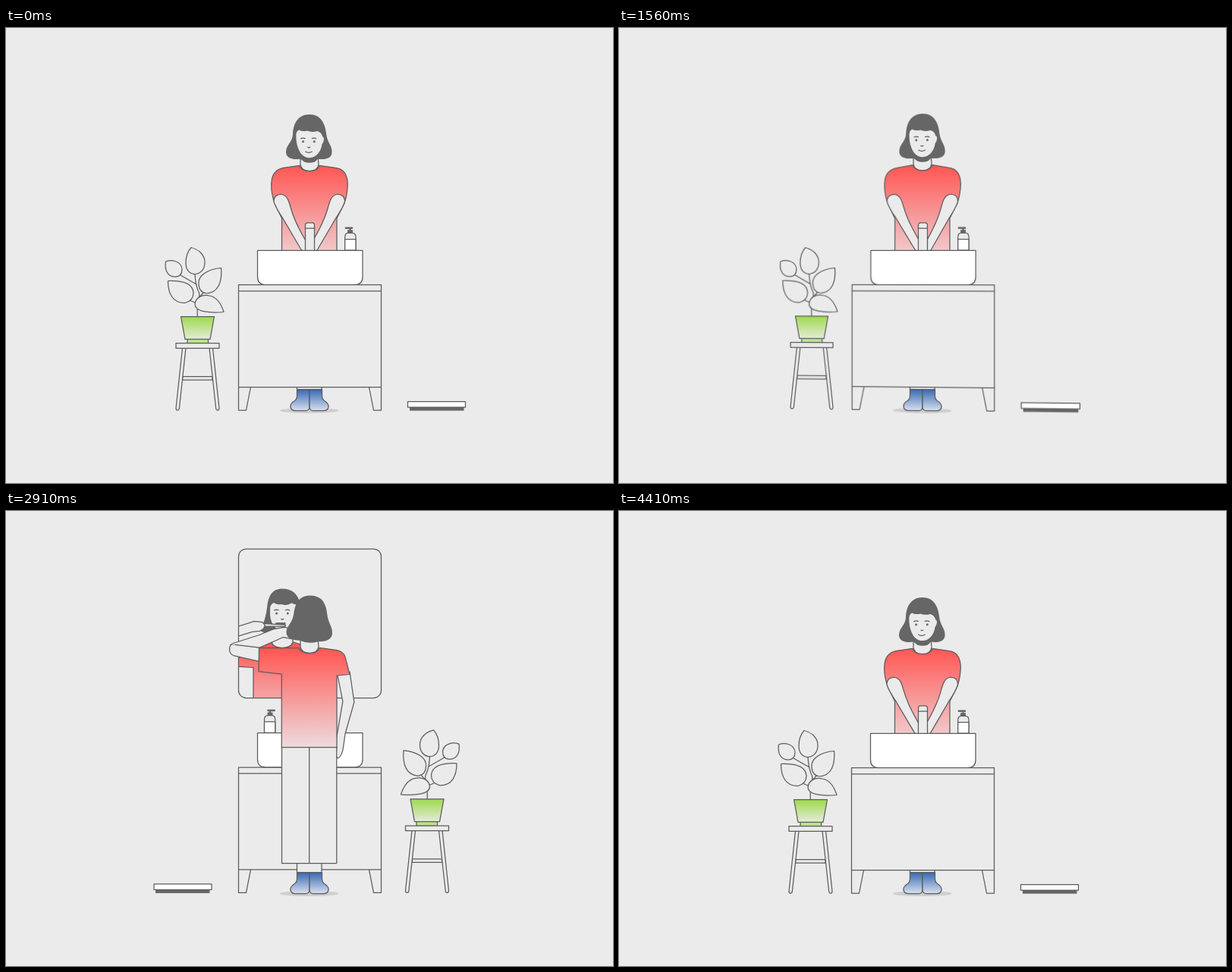
These frames come from a looping animation (800 px wide and 600 px high, 4.44 s). An HTML page:

```html
<!DOCTYPE html>
<html lang="en">
<head>
<meta charset="utf-8">
<title>Bathroom routine</title>
<style>
  html, body { margin: 0; width: 100%; height: 100%; overflow: hidden; background: #ebebeb; }
  #stage { position: absolute; left: 0; top: 0; width: 800px; height: 600px; overflow: hidden;
    perspective: 1150px; perspective-origin: 400px 300px; }
  svg { position: absolute; left: 0; top: 0; transform-origin: 400px 300px; }
  .ln { fill: none; stroke: #5c5c5c; stroke-width: 1.25; stroke-linejoin: round; stroke-linecap: round; }
  .bg { fill: #ebebeb; }
  .wh { fill: #fff; }
  .dk { fill: #666; }
</style>
</head>
<body>
<div id="stage"></div>
<script>
const LOOP = 4440, STEP = 30, TURN = 1680, CUT = 3900;
const TAU = Math.PI * 2;

const path = (d, cls = 'ln bg', more = '') => `<path d="${d}" class="${cls}" ${more}/>`;
const rect = (x, y, w, h, cls = 'ln bg', more = '') =>
  `<rect x="${x}" y="${y}" width="${w}" height="${h}" class="${cls}" ${more}/>`;
const dot = (x, y, r = 1.5) => `<circle cx="${x}" cy="${y}" r="${r}" class="dk"/>`;
const group = (id, body) => `<g id="${id}">${body}</g>`;
const flip = (width, body) => `<g transform="matrix(-1 0 0 1 ${width} 0)">${body}</g>`;
const grad = (id, y1, y2, a, b) =>
  `<linearGradient id="${id}" gradientUnits="userSpaceOnUse" x1="0" x2="0" y1="${y1}" y2="${y2}">
   <stop stop-color="${a}"/><stop offset="1" stop-color="${b}"/></linearGradient>`;
const paint = id => `style="fill:url(#${id})"`;

const defs = '<defs>' +
  grad('red', 183, 313, '#ff5855', '#eedcdf') +
  grad('redGlass', 175, 298, '#ff5855', '#eedcdf') +
  grad('green', 381, 411, '#9fda50', '#e6ecdc') +
  grad('blue', 477, 505, '#3a6ab4', '#dbe2ef') +
  '<clipPath id="glass"><rect x="306.5" y="50" width="188" height="196.5" rx="10"/></clipPath></defs>';

const leaves =
  path('M249 324Q249.5 337 253 346M230 326L251 338M262 347L254 356M243 359.5L250 362.5' +
       'M253 346Q257 352 252.5 359Q252 364 252.3 380', 'ln') +
  path('M244 289.5C239 295 237 302 237 310C237 319 242 324.5 249 324.5C257 324 262 318 262 309C262 299 254 292 244 289.5Z') +
  path('M210.5 308C218 305 231 307 232 318C232 325 229 328 223 328C212 328 209 318 210.5 308Z') +
  path('M283.5 316.5C266 318 253 326 254 337C254 345 258 349 264 350C280 349 285 335 283.5 316.5Z') +
  path('M213.5 333.5C228 333 246 335 247 349C247 357 242 361 236 362.5C219 363 213.5 349 213.5 333.5Z') +
  path('M249 364C250 355 259 351 268 353C279 355 284 365 287 374.5C270 376 249 375 249 364Z');

const plant = id =>
  group(id, leaves) +
  rect(239, 409, 27.5, 7, 'ln', 'style="fill:#b9e387"') +
  path('M230.5 380.5H274.5L269 410.3H236Z', 'ln', paint('green')) +
  path('M233 459.5H272V464H232.5Z') +
  path('M232.5 422L224 501.5Q224 504 226 504Q228 504 228.3 502L237 422Z') +
  path('M268 422L276.7 502Q277 504 279 504Q281 504 281 501.5L272.5 422Z') +
  rect(224, 415.7, 57, 6.6);

const scales = rect(532, 500, 71.5, 4.6, 'dk') + rect(529.5, 492.5, 76, 7.5, 'ln wh');

const soap =
  path('M446.7 293V276Q446.7 270.3 451 270.3H456.5Q461 270.3 461 276V293Z') +
  rect(446.7, 278.5, 14.3, 14.5, 'ln wh') +
  rect(450, 266.3, 7, 4, 'dk') + rect(452.4, 264, 2.2, 3, 'dk') +
  rect(446.6, 262.5, 10.6, 2.4, 'dk', 'rx="1"');

const sink = path('M331.5 293.3H470V328Q470 338.5 460 338.5H341.5Q331.5 338.5 331.5 328Z', 'ln wh');

const cabinet =
  path('M306.5 473.5V504H316.5L322.5 473.5M494.5 473.5V504H484.5L478.5 473.5') +
  rect(306.5, 338.7, 188, 134.8) + path('M306.5 346.8H494.5', 'ln');

const sock = path('M383.5 476.5V485Q383.5 490 379 492.5Q374.5 495.5 375 500' +
  'Q376 504.5 381 504.5H396Q400 504 400 499V476.5Z', 'ln', paint('blue'));
const feet =
  '<ellipse cx="399.7" cy="504.5" rx="39" ry="3.6" fill="#cfcfcf"/>' +
  rect(383.5, 455, 32.5, 22) + sock + flip(800, sock);

const neck = path('M388 168V180Q389 188.5 400 188.8Q411 188.5 412 180L411 168Z');

// Facial features shared by the person and the reflection, centred on the eyes
const face =
  path('M-10.5 -4Q-8 -5.3 -5 -4.2M4 -4.2Q7 -5.3 9.5 -4', 'ln') +
  dot(-7.7, 0) + dot(7, 0) + path('M-1.5 7.5Q0 8.8 1.5 7.5', 'ln');

const washArm = path('M353 229C353 221 359 218.5 364 219.5C371 221 373 229 375.5 238' +
  'C379 251 385 263 393 277L400 290V300H394L388 290.5L364 249.5Q356 238 353 229Z');

const front =
  feet +
  group('frontTorso', '') +
  group('armL', washArm) + flip(799.5, group('armR', washArm)) +
  group('frontHead',
    path('M400 114C384 114 378.5 127 378 140C377.5 151 369 154 369 163.5C369 172 378 174 388 172.7' +
         'L393 176.5Q400 179 407 176.5L411 172.7C421 174 429.5 172 429.5 163.5' +
         'C429.5 154 423 151 422 139C420.5 126 415 114 400 114Z', 'dk') +
    path('M382.3 141Q382.5 136 386 134.5Q391 137 397 135.5Q403 138 410 136Q416 137.5 416.8 143' +
         'Q419.5 144 418.8 148Q418 152 416.5 153C415 164 408 171.2 399.5 171.2' +
         'C389 171.2 382 158 382.3 141Z', 'bg') +
    group('frontFace', face + path('M-4.5 13.3Q-.5 16 4 13.3', 'ln'))) +
  rect(394.5, 256.8, 12, 40, 'ln bg', 'rx="3"') + path('M394.5 264.2H406.5', 'ln') +
  soap + sink + cabinet + plant('frontLeaves') + scales;

const reflection =
  path('M306 194L335 178L352 172H376L392 177V248H326V206.5L306 205Z', 'ln', paint('redGlass')) +
  group('mirHead',
    path('M361 105C348 105 343.5 114 341.5 126C339.5 144 336 152 331.5 160Q340 166 353 161L372 165L385 150' +
         'V125C381 111 374 105 361 105Z', 'dk') +
    path('M345 140V130Q346 125 350 123.5Q354 126.5 360 125.5Q368 128 373 124L379 126V142C378 153 371 160 362 160' +
         'C352 160 346 151 345 140Z', 'bg') +
    group('mirFace', face)) +
  path('M350 167V173Q352 180 364 180.5Q376 180 378 173V164') +
  group('brush',
    rect(355, 148.3, 13, 3.2, 'dk') +
    path('M338 149.5L367 151.3Q369 152.5 367 153.6L338 153.2Z') +
    path('M300 155L327 146.5L337.5 147.8L341 152L339 156.5L334 159.5L324 160.5L300 168Z'));

const back =
  '<g transform="translate(0 -.7)">' +
  flip(801, cabinet) + sink + flip(801.5, soap) + flip(807.5, plant('backLeaves')) + flip(800.5, scales) + '</g>' +
  `<g clip-path="url(#glass)">${reflection}</g>` +
  rect(306.5, 50, 188, 196.5, 'ln', 'rx="10"') +
  feet +
  group('hang', '') +
  group('raised',
    path('M334 181L303 177L296 177.5Q294 181 295 187Q297 191.5 303 192.5L336 200Z') +
    path('M296 177.8Q298 175.5 303 174.3L333 164.8L352 157L366 154.5L380 156L378 170L365 167.5L352 173.5L334 181.3L302 177.5')) +
  rect(363.5, 311, 72.3, 153.5) + path('M399.7 311V464.5', 'ln') +
  group('backTorso', '') +
  group('backHead',
    path('M399.5 114C385 114 379.5 124 378 138C376.5 152 369 154 369 163.5C369 171 377 174 387 173.7' +
         'Q399 178.5 411 174.3C422 174 429.5 171 429.5 162.5C429.5 154 424 150 422 138' +
         'C420 123 414 114 399.5 114Z', 'dk'));

const stage = document.getElementById('stage');
const open = id => `<svg id="${id}" width="800" height="600" viewBox="0 0 800 600">`;
stage.innerHTML = `<svg width="0" height="0">${defs}</svg>${open('front')}${front}</svg>${open('back')}${back}</svg>`;

const $ = id => document.getElementById(id);
const move = (id, v) => $(id).setAttribute('transform', v);
const wave = (t, peak, period) => Math.cos(TAU * (t - peak) / period);

// Degrees turned away from the viewer; speeds up towards the swap, then settles
function turnAngle(t) {
  const d = t - TURN;
  if (Math.abs(d) > 330) return 0;
  return d < 0 ? -90 * Math.pow(.45, -d / 30) : 90 * Math.pow(.51, d / 30);
}

function drawFront(t) {
  const up = (1 - wave(t, 200, 1900)) / 2;
  const y = 181.5 - 1.6 * up;
  $('frontTorso').innerHTML =
    path(`M387 ${y}Q389 ${y + 7} 400 ${y + 7.3}Q411 ${y + 7} 413 ${y}L434 184.3` +
      'Q450 186 450.3 206Q450 219 446 231L436 251V300H363.5V251L354 231Q349.5 219 349.7 206Q350 187 366 184.3Z',
      'ln', paint('red')) +
    `<g transform="translate(0 ${-1.6 * up})">${neck}</g>`;
  const rub = .7 * Math.sin(TAU * t / 555);
  move('armL', `rotate(${rub} 362 222)`);
  move('armR', `rotate(${-rub} 362 222)`);
  move('frontHead', `translate(${.4 * up} ${.2 - 2 * up})`);
  move('frontFace', `translate(399.2 ${150 - 2 * up})`);
}

function drawBack(t) {
  const up = (1 - wave(Math.max(t, 2160), 2160, 1300)) / 2;
  const tilt = .3 + 1.15 * wave(Math.max(t, 1990), 2690, 1400);
  const lift = 1.4 * up;
  const y = 181.7 - lift;
  $('backTorso').innerHTML =
    path(`M333.5 ${y}L386 ${y + .2}Q389 ${y + 7} 400 ${y + 7.3}Q411 ${y + 7} 413 ${y}L435 ${y + 3}` +
      `Q445 ${y + 5} 447 ${y + 12}L453 215.5L436 217V311.5H363.3V${216 - lift * .7}L333 ${213 - lift}Z`,
      'ln', paint('red')) +
    `<g transform="translate(0 ${-lift})">${neck}</g>`;
  const e = 457 + 2 * up;
  $('hang').innerHTML =
    path(`M453 212L${e} 252L447 294L444.5 312Q443 323 437.5 326Q434.5 325 435.5 316V300L${e - 15} 251L436 212Z`);
  move('raised', `translate(0 ${-lift * .8})`);
  move('backHead', `translate(0 ${.2 - 2.8 * up}) rotate(${1.9 * tilt} 400 180)`);
  move('mirHead', `translate(${.8 + 2.4 * tilt} ${.2 - 2.8 * up})`);
  move('mirFace', `translate(361.2 ${138.5 - 1.2 * up})`);
  move('brush', `translate(${.8 * tilt + .4 * Math.sin(TAU * t / 370)} ${.3 - 1.6 * up})`);
  const s = (t - 1740) / 960;
  const sway = s > 0 && s < 1 ? 2 * Math.sin(Math.PI * s) ** 2 : 0;
  move('backLeaves', `rotate(${sway} 252.3 378)`);
}

function show(id, on, angle) {
  const el = $(id);
  el.style.visibility = on ? 'visible' : 'hidden';
  el.style.transform = angle ? `rotateY(${angle}deg)` : 'none';
}

function render(ms) {
  const t = Math.floor((ms + 2) / STEP) * STEP % LOOP;
  const isBack = t >= TURN && t < CUT;
  const angle = turnAngle(t);
  if (isBack) drawBack(t);
  else drawFront(t >= CUT ? t - LOOP : t);
  show('front', !isBack, angle);
  show('back', isBack, angle);
}

const start = performance.now();
function tick(now) {
  render(Math.max(0, now - start));
  requestAnimationFrame(tick);
}
render(0);
requestAnimationFrame(tick);
</script>
</body>
</html>
```
